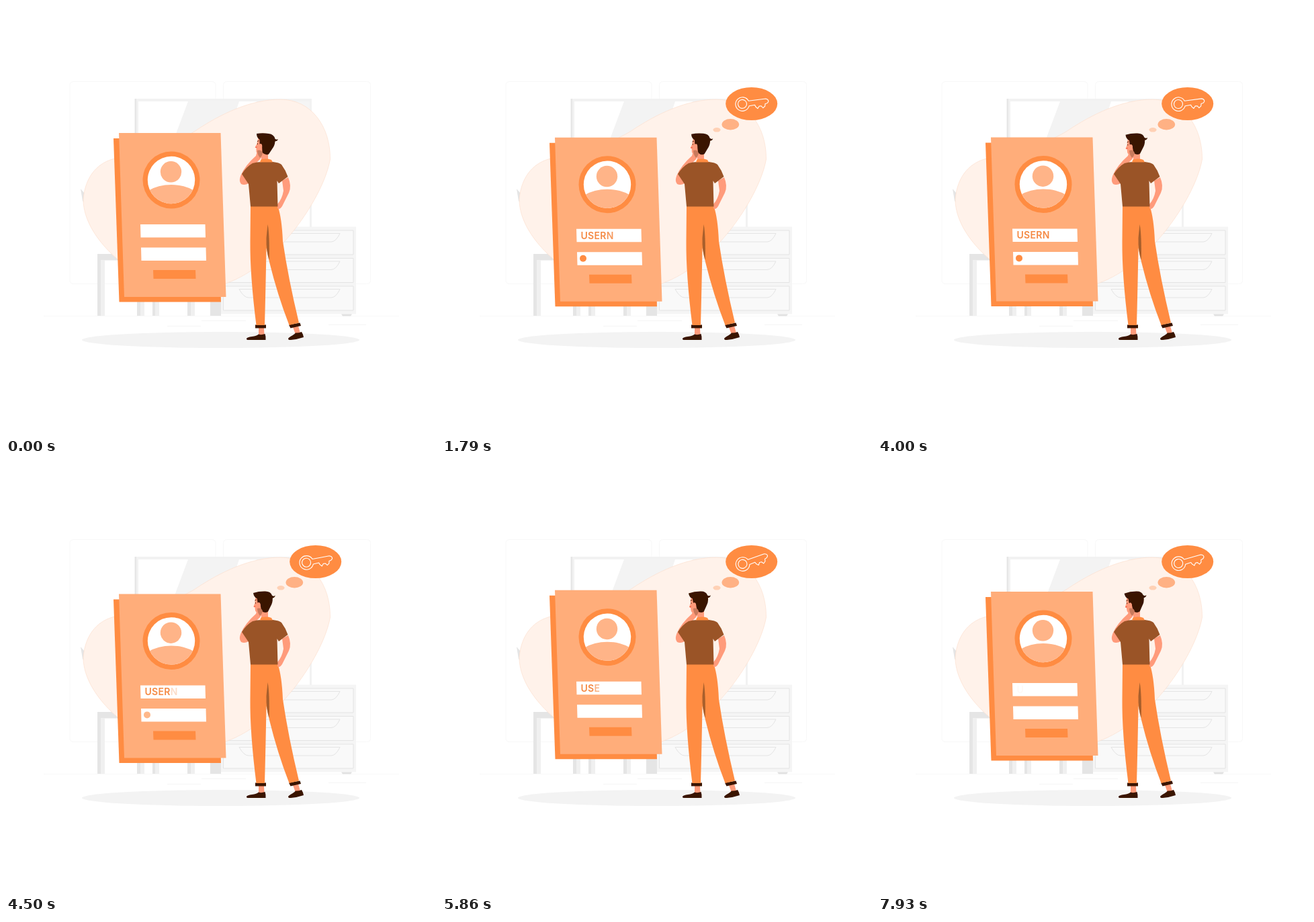
An HTML page that plays this animation: 640 by 640 pixels, repeating every 8 s.

```html
<!DOCTYPE html>
<html lang="en">
<head>
<meta charset="utf-8">
<title>Login</title>
<style>
  html, body { margin: 0; width: 100%; height: 100%; overflow: hidden; background: #fff; }
  svg { display: block; width: 100%; height: 100%; }
  text { font: 600 14px Inter, Roboto, sans-serif; letter-spacing: .3px; }
</style>
</head>
<body>
<svg viewBox="0 0 640 640">
  <defs>
    <clipPath id="disc"><circle cx="246" cy="259" r="35.2"/></clipPath>
  </defs>

  <g fill="none" stroke="#f8f8f8">
    <rect x="95" y="112.5" width="217" height="301" rx="5"/>
    <rect x="323.5" y="112.5" width="219" height="301" rx="5"/>
    <path d="M56 461.5H585"/>
    <path d="M291 468.5H357M240 476.5H290M480 474.5H536" stroke="#f5f5f5"/>
  </g>

  <!-- board -->
  <path fill="#f2f2f2" d="M192 138H455V330H192Z"/>
  <path fill="#e6e6e6" d="M191.500 138H194V330H191.500Z"/>
  <path fill="#fff" d="M197 142H452V330H197Z"/>
  <path fill="#f3f3f3" d="M271 142H347L326 206H247Z"/>
  <path fill="#f5f5f5" d="M373 142H452V160H367Z"/>

  <!-- drawers -->
  <path fill="#f5f5f5" d="M320 328.500H521V458.500H320Z"/>
  <path fill="#e2e2e2" d="M499 458.500H515L513 461.500H501Z"/>
  <g id="drawers" fill="#f9f9f9" stroke="#e4e4e4"></g>

  <!-- table -->
  <path fill="#e5e5e5" d="M136 369H180V378.500H141V461H136ZM195 400H200V461H195ZM218 400H222V461H218ZM270 400H275V461H270ZM304 400H320V461H304Z"/>
  <path fill="#f0f0f0" d="M141 378.500H147V461H141ZM200 400H206V461H200ZM222 400H228V461H222ZM275 400H281V461H275Z"/>
  <path fill="#e5e5e5" d="M111 272L117 279V294L114 290Z"/>

  <path fill="#fff2ea" stroke="#fbdcc9" stroke-width=".6" d="M408 139C455 139 483 180 482.500 228C474 280 408 385 327 413C260 425 205 410 166 377C135 350 115 318 115 288C118 250 140 232 162 227C200 220 240 210 280 187C320 160 365 139 408 139Z"/>
  <ellipse cx="319.500" cy="497" rx="206.500" ry="12" fill="#f3f3f3"/>

  <g id="card">
    <path fill="#ff8c42" d="M160 197H312L320 440.500H168.500Z"/>
    <path fill="#ffad7a" d="M168 189H319.500L327.500 433H176Z"/>
    <circle cx="246" cy="259" r="42.500" fill="#ff8c42"/>
    <circle cx="246" cy="259" r="35.200" fill="#fff"/>
    <g fill="#ffb488">
      <circle cx="245.500" cy="246.800" r="15.700"/>
      <ellipse cx="246" cy="296" rx="48" ry="30" clip-path="url(#disc)"/>
    </g>
    <path fill="#fff" d="M200 325H296.500L297 344.500H200.500ZM201 359.500H297.500L298 379H201.500Z"/>
    <path fill="#ff8c42" d="M219 393H282L282.500 406H219.500Z"/>
    <text id="name" x="206.500" y="340" fill="#f58943"></text>
    <circle id="dot" cx="210" cy="369" r="5" fill="#ff8c42"/>
  </g>

  <!-- feet and legs -->
  <path fill="#ff9b7b" d="M376 479H384L384.500 490H376ZM427 478L435 476L438 487L431 489Z"/>
  <g fill="#3a1500">
    <path d="M358 495Q359 493 366 492Q373 491 376 488.500Q380 490 385.500 488Q387 492 386.500 497H361Q357.500 497 358 495Z"/>
    <path d="M420 495Q421 493 426 490.500Q430 488 431 486.500Q435 487 440 485Q442 488 443 493Q434 496 424 497Q420 497.500 420 495Z"/>
    <path d="M371 474.500H387V479.500H371ZM421 474.500L437.500 471.500L439 476L423.500 479.500Z"/>
  </g>
  <path fill="#ff8c42" d="M364 298H404.500Q410.500 315 412 350Q420 405 436 471.500L421.500 475Q404 430 392 381L387.500 360Q386.500 420 385 475H372.500Q363 400 363.500 350Z"/>
  <path fill="#a85f2c" d="M389.500 325Q392.500 340 391.800 378Q387 365 387.500 345Z"/>

  <!-- torso and arms -->
  <path fill="#ff9b7b" d="M411 260L420 255Q425.500 268 421 278L411 298Q407 304 404 301V295Q411 287 413 275Z"/>
  <path fill="#ff9b7b" d="M380 213H390V232H380Z"/>
  <g id="head">
    <path fill="#ff9b7b" d="M376 196Q373.500 201 373.500 205L370.500 210.500L372.500 211.500L372.500 217Q374 221 380 221L389 218L388 197Z"/>
    <path fill="#3a1500" d="M373 190Q382 188.500 391 190Q399 191 400.300 197.500Q403 199.800 404.800 198Q404.500 201 400.500 201.500Q400 208 396 213L391 220.500Q386 223 381.500 218L381 207L377.500 205.500L377.500 199Q373 196 373 190Z"/>
    <ellipse cx="379" cy="208.500" rx="2.200" ry="3.500" fill="#ff9b7b"/>
    <path d="M374 201.500L376.500 200.500M374.500 204.500V206" stroke="#3a1500" stroke-width=".9"/>
    <path d="M371.500 210.500L373.500 210" stroke="#f0503c" stroke-width="1.200"/>
  </g>
  <path fill="#ff9b7b" d="M374 216Q380 215 381.500 221Q380 227 375 231L362 245L361 264Q355 267.500 350 265Q346 261 349.500 252Q356 237 372 223Z"/>
  <path fill="#c97a5c" d="M374 215Q380 213 382 219Q381 224 378 226Q374 221 374 215Z"/>
  <path fill="#9a5427" d="M367 234Q374 232 381 232H397Q407 233 410 236Q416 244 419.500 254L406 264L403.500 260L404.500 298.500H364L361 265L351 250Q358 239 367 234Z"/>
  <path fill="#ff8c42" d="M379.500 228.500Q388 226.500 395 229L397 232.500H378Z"/>

  <!-- thought -->
  <ellipse id="b0" cx="409" cy="184.300" rx="5.500" ry="3.300" fill="#ffd1b5"/>
  <ellipse id="b1" cx="429.300" cy="176.300" rx="12.800" ry="8.200" fill="#ffb184"/>
  <g id="b2">
    <ellipse cx="460.700" cy="145.500" rx="38.500" ry="24.500" fill="#ff8c42"/>
    <g id="key" fill="none" stroke="#fff" stroke-width="1.100" stroke-linejoin="round">
      <path d="M456.500 141L482 139Q486 140 486 143Q485 146 481 146.500L480.500 150L477.500 152.500L475 149.500L472 149.500L469.500 153L466.500 150L465.500 147.500L457 148.500A10.300 10.300 0 1 1 456.500 141Z"/>
      <circle cx="447" cy="145.200" r="6.500"/>
    </g>
  </g>
</svg>
<script>
const LOOP = 8000;
const $ = id => document.getElementById(id);
const clamp = v => Math.max(0, Math.min(1, v));
const set = (id, attr, v) => $(id).setAttribute(attr, v);

const LIFT = [[0, 0], [1070, 4.2], [2000, 7.3], [2900, 8.5], [4000, 6.4], [5070, 1.8],
              [6000, -1.75], [6600, -2.45], [7000, -2.2], [7930, 1], [8000, 1.3]];
const TYPED = [[0, 0], [1070, 3.5], [2640, 6.1], [2900, 6.15], [4000, 5], [5070, 3.5],
               [7000, 1.45], [7930, .05], [8000, 0]];

// Smooth curve through [time, value] points.
function curve(pts, t) {
  let i = 0;
  while (i < pts.length - 2 && t >= pts[i + 1][0]) i++;
  const at = k => pts[Math.max(0, Math.min(pts.length - 1, k))];
  const slope = k => {
    const [a, b] = [at(k - 1), at(k + 1)];
    return (b[1] - a[1]) / (b[0] - a[0]);
  };
  const [t0, v0] = at(i), [t1, v1] = at(i + 1);
  const d = t1 - t0, u = (t - t0) / d, w = 1 - u;
  return v0 * w * w * (1 + 2 * u) + v1 * u * u * (3 - 2 * u)
       + d * u * w * (slope(i) * w - slope(i + 1) * u);
}

$('drawers').innerHTML = [334, 375.5, 417].map(y =>
  `<path d="M323.500 ${y}H517V${y + 36}H323.500Z"/>` +
  `<path d="M347 ${y + 4.5}Q354 ${y + 17} 361 ${y + 17}H484Q491 ${y + 17} 497 ${y + 4.5}Z"/>`).join('');
$('name').innerHTML = [...'USERNAME'].map(c => `<tspan>${c}</tspan>`).join('');
const letters = [...$('name').children];

function draw(t) {
  const y = curve(LIFT, t), n = curve(TYPED, t);
  set('card', 'transform', `translate(0 ${y})`);
  letters.forEach((el, i) => el.setAttribute('fill-opacity', clamp(n - i)));
  set('dot', 'opacity', clamp((n - 3.8) / .8));

  const turn = Math.sin(Math.PI / 2 * clamp(t / 7500)) ** 1.2;
  set('head', 'transform', `rotate(${-10 * turn} 385 228)`);
  set('key', 'transform', `rotate(${(y - 8.4) * 1.55} 461 145.500)`);
  [300, 870, 1280].forEach((from, i) => set('b' + i, 'opacity', clamp((t - from) / 190)));
}

function tick() {
  draw(performance.now() % LOOP);
  requestAnimationFrame(tick);
}
tick();
</script>
</body>
</html>
```
